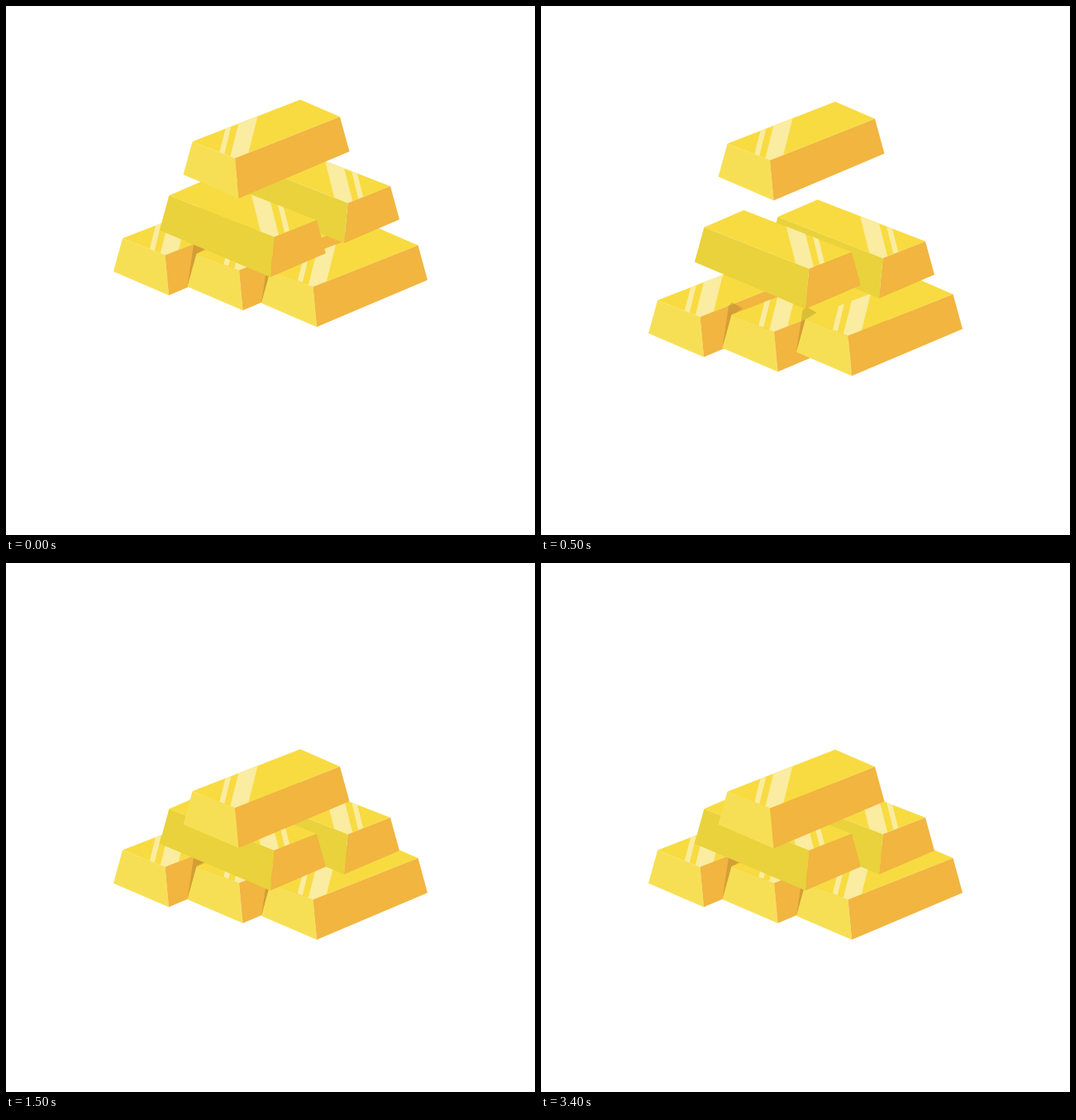
These frames come from a looping animation (640 px wide and 640 px high, 3600 ms). An HTML page with a canvas:

```html
<!DOCTYPE html>
<html>
<head>
<meta charset="utf-8">
<title>Gold bars</title>
<style>
html, body { margin: 0; height: 100%; overflow: hidden; background: #fff; }
canvas { display: block; }
</style>
</head>
<body>
<canvas id="stage" width="640" height="640"></canvas>
<script>
const ctx = document.getElementById('stage').getContext('2d');
const { PI, sin, exp, max } = Math;
const LOOP = 3600, STEP = 100;
const TOP = '#f8db41', LIGHT = '#f7df55', ORANGE = '#f1b540', OLIVE = '#e9d23b';
const SHINE = '#faeca0', SHADE = 'rgba(60,40,0,.16)';

// Back to front. x, y: resting place of the near top corner; height: length of the fall.
const bars = [
  { x: 192.5, y: 367.7, height: 67.5, start: -10, land: 390, bounce: 15 },
  { x: 282, y: 387.3, height: 67.5, start: 65, land: 465, bounce: 15, shadow: true },
  { x: 371.5, y: 407.2, height: 67.5, start: 140, land: 540, bounce: 15, shadow: true },
  { x: 413.5, y: 328.2, height: 89.8, start: 265, land: 665, bounce: 15, flip: true },
  { x: 324.3, y: 347.7, height: 68.3, start: 350, land: 700, bounce: 0, flip: true },
  { x: 277, y: 296.7, height: 122.4, start: 460, land: 860, bounce: 15, lift: 10 }
];

function poly(color, ...p) {
  ctx.fillStyle = color;
  ctx.beginPath();
  for (let i = 0; i < p.length; i += 2) ctx.lineTo(p[i], p[i + 1]);
  ctx.fill();
}

// Fall, then a damped rebound; longer falls brake more before landing.
function offset({ height, start, land, bounce, lift = 0 }, t) {
  if (t >= land) {
    const s = (t - land) / 1000;
    return bounce * sin(5 * PI * s) * exp(-5 * s);
  }
  const u = max(0, (t - start) / (land - start));
  const fallen = u + height / 750 * sin(PI * u) - 0.06 * sin(3 * PI * u);
  return height * (fallen - 1) + lift * max(0, 1 - t / 200) ** 2;
}

function drawBar(bar, t) {
  ctx.save();
  ctx.translate(bar.x, bar.y + offset(bar, t));
  if (bar.flip) ctx.scale(-1, 1);
  if (bar.shadow) poly(SHADE, -38, -28, -51, -35.5, -55, -31, -62.5, 20, -51, -20);
  poly(TOP, 0, 0, -51.5, -20.3, 79, -71, 127, -50.2);
  poly(SHINE, 4.4, -42.2, 27.5, -51.1, 16.3, -6.4, 0, 0, -5.7, -2.3);
  poly(SHINE, -11.5, -36, -4.6, -38.7, -12.8, -5.1, -18.7, -7.4);
  poly(bar.flip ? ORANGE : LIGHT, 0, 0, -51.5, -20.3, -62.5, 19.8, 4.5, 48.5);
  poly(bar.flip ? OLIVE : ORANGE, 0, 0, 127, -50.2, 138.5, -8.2, 4.5, 48.5);
  ctx.restore();
}

function frame(now) {
  const t = Math.floor(now % LOOP / STEP) * STEP;
  ctx.clearRect(0, 0, 640, 640);
  for (const bar of bars) drawBar(bar, t);
  requestAnimationFrame(frame);
}
frame(0);
</script>
</body>
</html>
```
